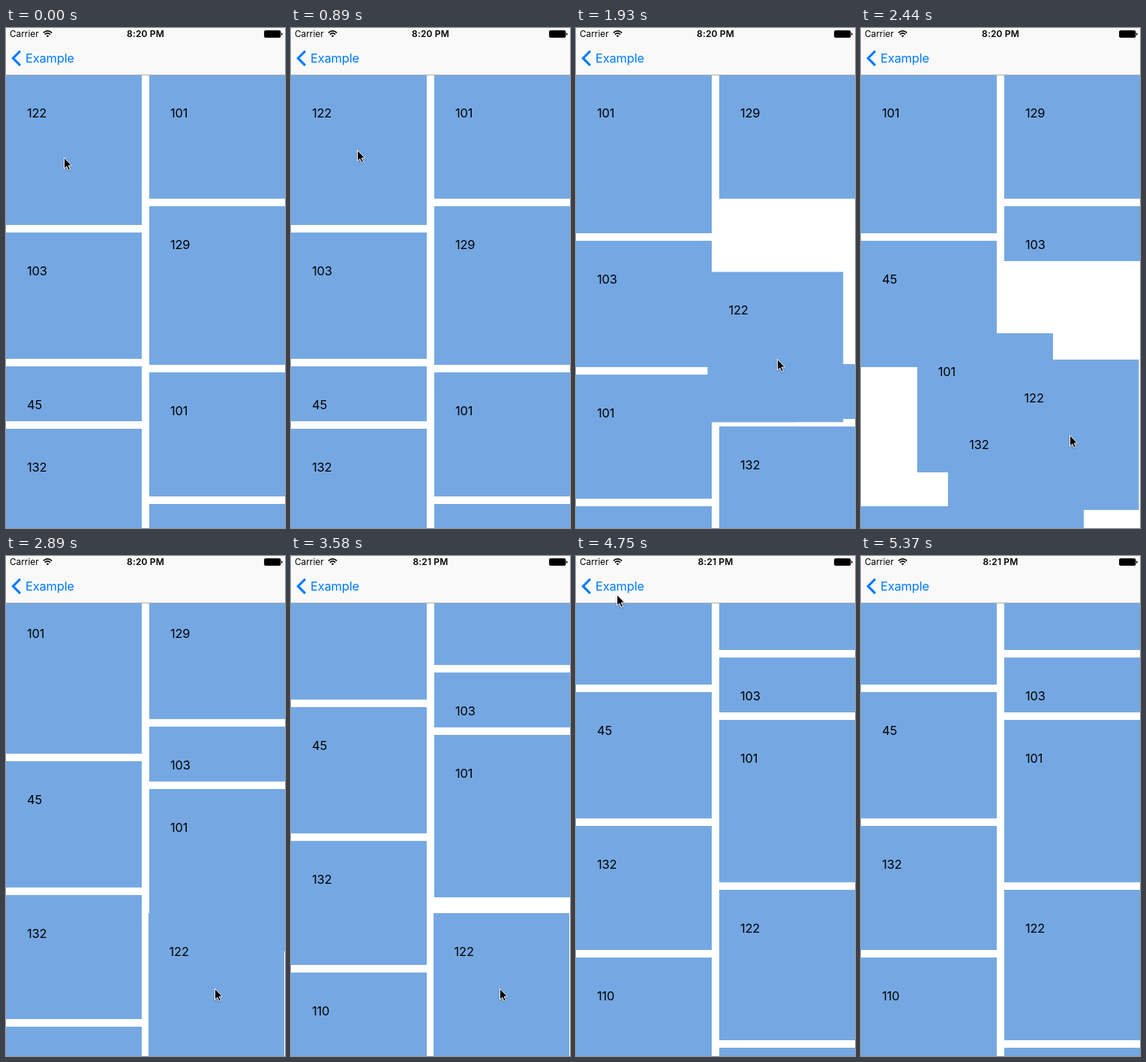
An HTML page that plays this animation: 372 px wide and 665 px high, repeating every 5.96 s.

```html
<!DOCTYPE html>
<html lang="en">
<head>
<meta charset="utf-8">
<title>Reorderable grid</title>
<style>
html, body { margin: 0; width: 100%; height: 100%; overflow: hidden; background: #fff; }
#stage {
  position: relative; width: 372px; height: 665px; overflow: hidden;
  background: #fff; color: #000; font-family: Inter, sans-serif;
}
#stage * { animation-duration: 5960ms; animation-iteration-count: infinite; animation-timing-function: linear; }

/* Grid */
#grid { position: absolute; inset: 0; animation-name: scroll; }
.cell {
  position: absolute; box-sizing: border-box; width: 181px;
  padding: 41px 0 0 28px; overflow: hidden;
  background: #75a8e3; font-size: 16.5px; line-height: 20px; letter-spacing: -.2px;
}
#grid .cell { animation-timing-function: ease-in-out; }
#c1 { animation-name: c1; }
#c2 { animation-name: c2; }
#c3 { animation-name: c3; }
#c4 { animation-name: c4; }
#c5 { animation-name: c5; }
#c6 { animation-name: c6; }
#c7 { height: 168px; animation-name: c7; }
#c8 { left: 191px; top: 756px; height: 168px; }
#held { left: 0; top: 0; height: 200px; animation-name: held; }

@keyframes scroll {
  0%, 46.88% { transform: translateY(0); }
  48.49% { transform: translateY(-10px); }
  60.07% { transform: translateY(-82px); }
  63.59%, to { transform: translateY(-102px); }
}
@keyframes c1 {
  0%, 23.32% { left: 191px; top: 62px; height: 165px; }
  28.36%, to { left: 0; top: 62px; height: 211px; }
}
@keyframes c2 {
  0%, 23.32% { left: 191px; top: 237px; height: 211px; }
  28.36%, to { left: 191px; top: 62px; height: 165px; }
}
@keyframes c3 {
  0%, 23.32% { left: 0; top: 272px; height: 168px; }
  28.36%, 32.89% { left: 0; top: 283px; height: 168px; }
  37.92%, to { left: 191px; top: 237px; height: 73px; }
}
@keyframes c4 {
  0%, 23.32% { left: 0; top: 450px; height: 73px; }
  28.36%, 32.89% { left: 191px; top: 447px; height: 73px; }
  37.92%, to { left: 0; top: 283px; height: 168px; }
}
@keyframes c5 {
  0%, 23.32% { left: 191px; top: 458px; height: 165px; }
  28.36%, 38.76% { left: 0; top: 461px; height: 165px; }
  43.79%, to { left: 191px; top: 320px; height: 216px; }
}
@keyframes c6 {
  0%, 23.32% { left: 0; top: 533px; height: 216px; }
  28.36%, 38.76% { left: 191px; top: 530px; height: 216px; }
  43.79%, to { left: 0; top: 461px; height: 165px; }
}
@keyframes c7 {
  0%, 23.32% { left: 191px; top: 633px; }
  28.36%, to { left: 0; top: 636px; }
}

/* The held cell trails the pointer, then drops into its slot */
@keyframes held {
  0%, 16.21% { transform: translate(0, 62px); }
  20.13% { transform: translate(59px, 115px); }
  23.99% { transform: translate(111.3px, 194.3px); }
  25.1% { transform: translate(132px, 220px); }
  29.63% { transform: translate(164px, 285px); }
  33.99% { transform: translate(182px, 347px); }
  39.7% { transform: translate(189.6px, 430px); }
  40.94%, 42.05% { transform: translate(189.6px, 441px); }
  45.4%, 64.6% { transform: translate(189.6px, 475px); animation-timing-function: ease-in-out; }
  69.63%, to { transform: translate(191px, 444px); }
}

/* Bars */
#bar { position: absolute; left: 0; top: 0; width: 372px; height: 62px; background: #f9f9f9; border-bottom: 1px solid rgba(0, 0, 0, .3); }
#bar svg { position: absolute; left: 0; top: 0; }
#bar span { position: absolute; white-space: nowrap; line-height: 20px; }
#carrier { left: 5px; top: -2px; font-size: 11.8px; }
#bar .time { left: 0; top: -2px; width: 372px; text-align: center; font-size: 12px; font-weight: 600; letter-spacing: .15px; }
#bar .before, #bar .after { animation-timing-function: step-end; }
#bar .before { animation-name: before; }
#bar .after { animation-name: after; }
#back { left: 26px; top: 30px; font-size: 16.5px; letter-spacing: -.2px; color: #007aff; }
@keyframes before { 0% { visibility: visible; } 50.67%, to { visibility: hidden; } }
@keyframes after { 0% { visibility: hidden; } 50.67%, to { visibility: visible; } }

/* Pointer */
#pointer {
  position: absolute; left: 0; top: 0; overflow: visible;
  filter: drop-shadow(0 1px 1px rgba(0, 0, 0, .3));
  animation-name: point, leave; animation-timing-function: linear, step-end;
}
@keyframes point {
  0%, 10.57% { transform: translate(77px, 172px); }
  13.42%, 15.1% { transform: translate(88px, 162px); }
  19.03% { transform: translate(147px, 215px); }
  22.89% { transform: translate(199px, 294px); }
  23.99% { transform: translate(220px, 320px); }
  28.52% { transform: translate(252px, 385px); }
  32.89% { transform: translate(270px, 447px); }
  38.59% { transform: translate(278px, 530px); }
  39.83%, 40.94% { transform: translate(278px, 541px); }
  44.3%, 64.6% { transform: translate(278px, 575px); }
  67.11%, 70.97% { transform: translate(283px, 561px); }
  73.66% { transform: translate(264px, 335px); animation-timing-function: ease-out; }
  80.54%, 85.91% { transform: translate(49px, 44px); }
  90.1%, to { transform: translate(333px, 453px); }
}
@keyframes leave { 0% { visibility: visible; } 90.1%, to { visibility: hidden; } }
</style>
</head>
<body>
<div id="stage">
  <div id="grid">
    <div class="cell" id="c1">101</div>
    <div class="cell" id="c2">129</div>
    <div class="cell" id="c3">103</div>
    <div class="cell" id="c4">45</div>
    <div class="cell" id="c5">101</div>
    <div class="cell" id="c6">132</div>
    <div class="cell" id="c7">110</div>
    <div class="cell" id="c8"></div>
  </div>
  <div class="cell" id="held">122</div>

  <div id="bar">
    <svg width="372" height="62" fill="none">
      <g stroke="#000" stroke-width="1.6">
        <path d="M49.8 6.4Q55.5 1.2 61.2 6.4"/>
        <path d="M51.8 8.6Q55.5 5.3 59.2 8.6"/>
      </g>
      <path d="M53.6 10.3Q55.5 8.7 57.4 10.3L55.5 12.3Z" fill="#000"/>
      <rect x="344.5" y="3.5" width="21.5" height="9" rx="1.6" fill="#000" stroke="#000" stroke-width=".8"/>
      <path d="M367.2 6.2q1.6 .4 1.6 1.8t-1.6 1.8z" fill="#000"/>
      <path d="M19 30.6L9.4 40.2L19 49.8" stroke="#007aff" stroke-width="3.1"/>
    </svg>
    <span id="carrier">Carrier</span>
    <span class="time before">8:20 PM</span>
    <span class="time after">8:21 PM</span>
    <span id="back">Example</span>
  </div>

  <svg id="pointer" width="12" height="19">
    <path d="M.5 .5V15L3.8 12L6.2 17.2L8.6 16.1L6.2 11H10.6Z" fill="#000" stroke="#fff"/>
  </svg>
</div>
</body>
</html>
```
